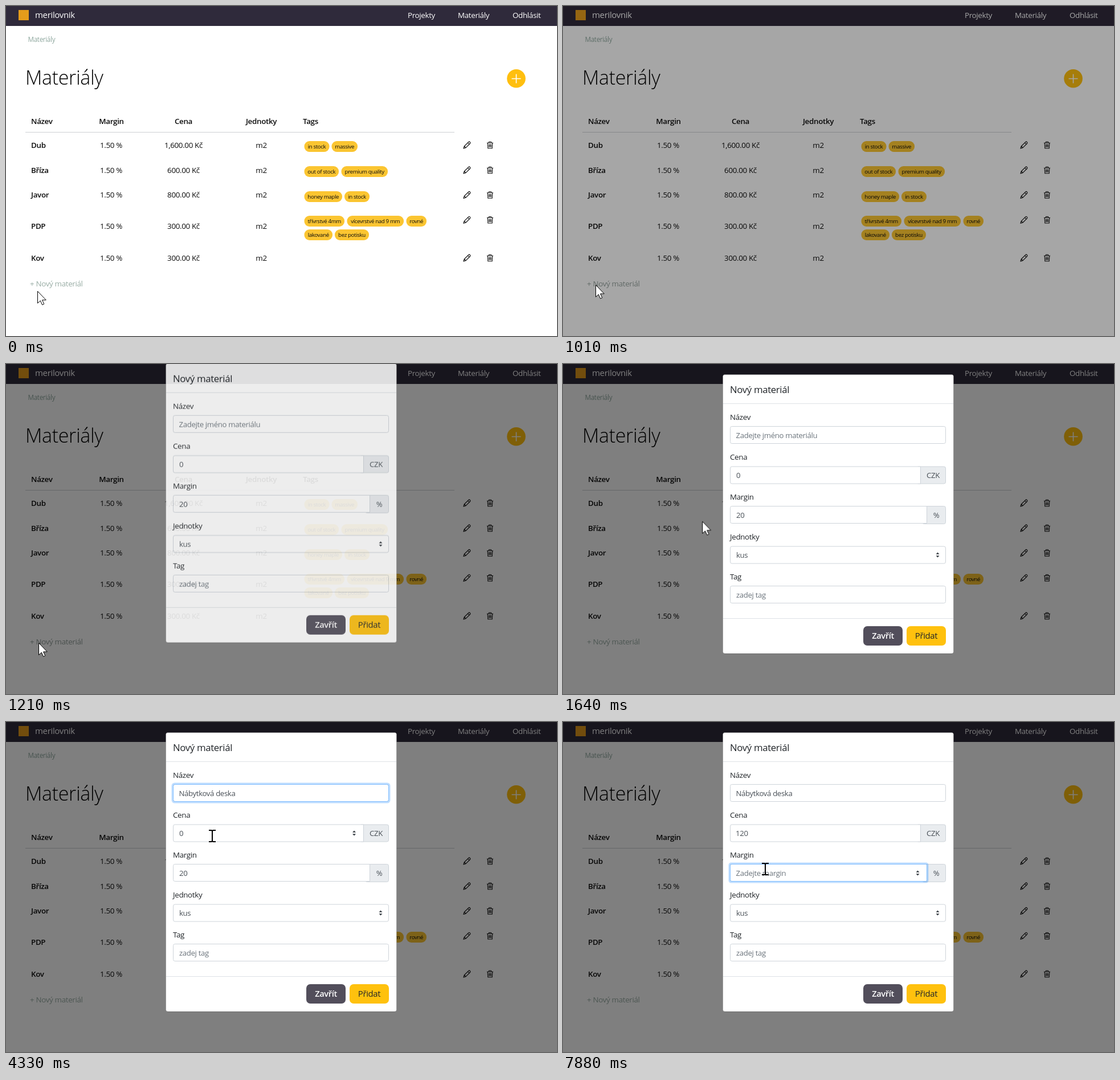
Write an HTML page that moves like this. It is 967 px wide and 579 px high and loops after 8 s.

```html
<!DOCTYPE html>
<html lang="cs">
<head>
<meta charset="utf-8">
<title>Materiály</title>
<style>
html, body { margin: 0; width: 100%; height: 100%; overflow: hidden; background: #fff; }
svg { display: block; width: 967px; height: 579px; font: 13.4px "Open Sans", "Noto Sans", sans-serif; letter-spacing: -.026em; fill: #0c0c0c; }
.mid { text-anchor: middle; }
.strong { font-weight: 600; }
.tags rect { fill: #fbc531; }
.tags text { font-size: 9.7px; }
.icon { fill: none; stroke: #111; stroke-width: 1.15; stroke-linejoin: round; }
.nav { fill: #fff; }
.box { fill: #fff; stroke: #ced4da; }
.addon { fill: #e9ecef; stroke: #ced4da; }
.value { font-size: 13.2px; fill: #495057; }
.hint { font-size: 13.2px; fill: #6c757d; }
.label { fill: #212529; }
.options text { font-size: 11.9px; font-weight: 500; }
.ring rect:first-child { fill: none; stroke: #007bff; stroke-opacity: .25; stroke-width: 3; }
.ring rect:last-child { fill: none; stroke: #80bdff; }
.caret { fill: #222; }

/* 1% = 80 ms */
.step { animation: 8s step-end infinite; }
.tween { animation: 8s linear infinite; }

#link { animation-name: link; }
@keyframes link { 0% { fill: #99ada5 } 1.6% { fill: #94a09c } 17% { fill: #99ada5 } }
#backdrop { animation-name: backdrop; }
@keyframes backdrop { 0%, 11.34% { opacity: 0 } 13.2%, 100% { opacity: .5 } }
#modal { animation-name: fade, drop; animation-timing-function: linear, ease-out; }
@keyframes fade { 0%, 13.5% { opacity: 0 } 15.4%, 100% { opacity: 1 } }
@keyframes drop { 0%, 13.5% { transform: translateY(-50px) } 17.25%, 100% { transform: none } }

#nameRing { animation-name: nameRing; }
@keyframes nameRing { 0%, 34.2% { opacity: 0 } 36.2%, 55.6% { opacity: 1 } 57.8%, 100% { opacity: 0 } }
#priceRing { animation-name: priceRing; }
@keyframes priceRing { 0%, 55.6% { opacity: 0 } 57.8%, 88.9% { opacity: 1 } 91%, 100% { opacity: 0 } }
#marginRing { animation-name: marginRing; }
@keyframes marginRing { 0%, 88.9% { opacity: 0 } 91%, 100% { opacity: 1 } }

#nameHint { animation-name: nameHint; }
@keyframes nameHint { 0% { opacity: 1 } 45.8%, 100% { opacity: 0 } }
#nameValue { animation-name: nameValue; }
@keyframes nameValue { 0% { opacity: 0 } 45.8%, 100% { opacity: 1 } }
#nameCaret { animation-name: nameCaret; }
@keyframes nameCaret { 0% { opacity: 0 } 34.9% { opacity: 1 } 42.25%, 100% { opacity: 0 } }
#options { animation-name: options; }
@keyframes options { 0%, 36.25% { opacity: 0 } 38.1%, 48.75% { opacity: 1 } 50%, 100% { opacity: 0 } }
#hover { animation-name: hover; }
@keyframes hover {
  0% { opacity: 0; transform: none }
  42.9% { opacity: 1; transform: none }
  43.8% { transform: translateY(32.5px) }
  44.8% { transform: translateY(65px) }
  45.8%, 100% { opacity: 1; transform: translateY(97.5px) }
}

#price0 { animation-name: price0; }
@keyframes price0 { 0% { opacity: 1 } 65%, 100% { opacity: 0 } }
#priceHint { animation-name: priceHint; }
@keyframes priceHint { 0% { opacity: 0 } 65% { opacity: 1 } 68.4%, 100% { opacity: 0 } }
#price1 { animation-name: price1; }
@keyframes price1 { 0% { opacity: 0 } 68.4% { opacity: 1 } 71.1%, 100% { opacity: 0 } }
#price12 { animation-name: price12; }
@keyframes price12 { 0% { opacity: 0 } 71.1% { opacity: 1 } 73.6%, 100% { opacity: 0 } }
#price120 { animation-name: price120; }
@keyframes price120 { 0% { opacity: 0 } 73.6%, 100% { opacity: 1 } }
#priceCaret { animation-name: priceCaret; }
@keyframes priceCaret {
  0% { opacity: 0; transform: translateX(8px) }
  56% { opacity: 1; transform: translateX(8px) }
  63.4% { opacity: 0 }
  65% { opacity: 1; transform: none }
  68.4% { transform: translateX(6px) }
  71.1% { transform: translateX(13px) }
  73.6% { opacity: 1; transform: translateX(19.5px) }
  80.25% { opacity: 0 }
  86.9% { opacity: 1 }
  89.4%, 100% { opacity: 0; transform: translateX(19.5px) }
}
#priceSpin { animation-name: priceSpin; }
@keyframes priceSpin { 0% { opacity: 0 } 24% { opacity: 1 } 25.5% { opacity: 0 } 51.2% { opacity: 1 } 89.4%, 100% { opacity: 0 } }

#margin20 { animation-name: margin20; }
@keyframes margin20 { 0% { opacity: 1 } 97%, 100% { opacity: 0 } }
#margin2 { animation-name: margin2; }
@keyframes margin2 { 0% { opacity: 0 } 97% { opacity: 1 } 98.5%, 100% { opacity: 0 } }
#marginHint { animation-name: marginHint; }
@keyframes marginHint { 0% { opacity: 0 } 98.5%, 100% { opacity: 1 } }
#marginCaret { animation-name: marginCaret; }
@keyframes marginCaret { 0% { opacity: 0 } 89.4% { opacity: 1 } 96%, 100% { opacity: 0 } }
#marginSpin { animation-name: marginSpin; }
@keyframes marginSpin { 0% { opacity: 0 } 86.2%, 100% { opacity: 1 } }

#pointer { animation-name: move; }
@keyframes move {
  0%, .4% { transform: translate(55px, 500px) }
  2.5%, 16.4% { transform: translate(57px, 489px) }
  19.63% { transform: translate(195px, 328px) }
  20.5% { transform: translate(244px, 276px) }
  23.75% { transform: translate(300px, 215px) }
  28%, 42.25% { transform: translate(339px, 130px) }
  46.25%, 48.75% { transform: translate(345px, 262px) }
  51.6%, 83.6% { transform: translate(362px, 200px) }
  86.9%, 100% { transform: translate(355px, 258px) }
}
#arrow { animation-name: arrow; }
@keyframes arrow { 0% { opacity: 1 } 24% { opacity: 0 } 25.5% { opacity: 1 } 27.5% { opacity: 0 } 42.55% { opacity: 1 } 48.75%, 100% { opacity: 0 } }
#beam { animation-name: beam; }
@keyframes beam { 0% { opacity: 0 } 24% { opacity: 1 } 25.5% { opacity: 0 } 27.5% { opacity: 1 } 42.55% { opacity: 0 } 48.75%, 100% { opacity: 1 } }
</style>
</head>
<body>
<svg viewBox="0 0 967 579" xmlns="http://www.w3.org/2000/svg">
  <defs>
    <g id="pencil" class="icon"><path d="M-6 6L-4.7 2L3 -5.7Q4 -6.5 5 -5.5Q6.5 -4 5.7 -3L-2 4.7ZM1.4 -4.1L4.1 -1.4M-4.7 2L-2 4.7"/></g>
    <g id="trash" class="icon"><path d="M-5.5 -3.8H5.5M-2 -4V-5.8H2V-4M-4.3 -3.5L-3.7 5.7H3.7L4.3 -3.5M-1.9 -1.5V3.7M0 -1.5V3.7M1.9 -1.5V3.7"/></g>
    <path id="updown" d="M-3 -1.3L0 -4.6L3 -1.3ZM-3 1.3L0 4.6L3 1.3Z" fill="#343a40"/>
  </defs>

  <rect width="967" height="579" fill="#fff"/>
  <rect width="967" height="35" fill="#2f2a3b"/>
  <rect x="22" y="7" width="18" height="18" fill="#e59c1b"/>
  <g class="nav">
    <text x="51" y="21" font-size="15">merilovnik</text>
    <text x="705" y="21">Projekty</text>
    <text x="793" y="21">Materiály</text>
    <text x="889" y="21">Odhlásit</text>
  </g>
  <text x="38.5" y="63" font-size="11.7" fill="#8fa89f">Materiály</text>
  <text x="34" y="137.5" font-size="34" font-weight="350" fill="#000">Materiály</text>
  <circle cx="895.5" cy="127.3" r="16.3" fill="#ffbf0f"/>
  <path d="M887.5 127.5H903.5M895.5 119.5V135.5" stroke="#fff" stroke-width="1.6"/>

  <g class="strong">
    <text x="44" y="207">Název</text>
    <text x="185" y="207" class="mid">Margin</text>
    <text x="311.5" y="207" class="mid">Cena</text>
    <text x="448" y="207" class="mid">Jednotky</text>
    <text x="521" y="207">Tags</text>
  </g>
  <path d="M34 221.5H787" stroke="#cdd0d4"/>
  <g id="rows"></g>
  <text id="link" class="step" x="42" y="491.5">+ Nový materiál</text>

  <rect id="backdrop" class="tween" width="967" height="579" fill="#000"/>

  <g id="modal" class="tween">
    <rect x="280.5" y="18.5" width="405" height="489.5" rx="3.5" fill="#fff" stroke="#000" stroke-opacity=".2"/>
    <path d="M281 69.5H685M281 446.5H685" stroke="#dee2e6"/>
    <text x="293" y="50.5" font-size="16.8" class="label">Nový materiál</text>
    <g class="label">
      <text x="293" y="98">Název</text>
      <text x="293" y="168">Cena</text>
      <text x="293" y="237.5">Margin</text>
      <text x="293" y="308">Jednotky</text>
      <text x="293" y="378">Tag</text>
    </g>

    <rect class="box" x="293.5" y="109.5" width="378" height="30" rx="3"/>
    <rect class="addon" x="620.5" y="180" width="51" height="30" rx="3"/>
    <path class="box" d="M627.5 180H296.5Q293.5 180 293.5 183V207Q293.5 210 296.5 210H627.5Z"/>
    <rect class="addon" x="630.5" y="249.5" width="41" height="31" rx="3"/>
    <path class="box" d="M638.5 249.5H296.5Q293.5 249.5 293.5 252.5V276.5Q293.5 279.5 296.5 279.5H638.5Z"/>
    <rect class="box" x="293.5" y="320" width="378" height="30" rx="3"/>
    <rect class="box" x="293.5" y="389.5" width="378" height="30" rx="3"/>

    <g id="nameRing" class="ring tween">
      <rect x="292" y="108" width="381" height="33" rx="4"/>
      <rect x="293.5" y="109.5" width="378" height="30" rx="3"/>
    </g>
    <g id="priceRing" class="ring tween">
      <rect x="292" y="178.5" width="337" height="33" rx="3"/>
      <rect x="293.5" y="180" width="334" height="30" rx="2"/>
    </g>
    <g id="marginRing" class="ring tween">
      <rect x="292" y="248" width="348" height="33" rx="3"/>
      <rect x="293.5" y="249.5" width="345" height="30" rx="2"/>
    </g>

    <text id="nameHint" class="hint step" x="303.5" y="130">Zadejte jméno materiálu</text>
    <text id="nameValue" class="value step" x="303.5" y="130">Nábytková deska</text>
    <rect id="nameCaret" class="caret step" x="304" y="117" width="1" height="16"/>

    <text id="price0" class="value step" x="304" y="200">0</text>
    <text id="priceHint" class="hint step" x="303.5" y="200">Zadejte cenu</text>
    <text id="price1" class="value step" x="303" y="200">1</text>
    <text id="price12" class="value step" x="303" y="200">12</text>
    <text id="price120" class="value step" x="303" y="200">120</text>
    <rect id="priceCaret" class="caret step" x="304" y="187" width="1" height="16"/>
    <g id="priceSpin" class="step"><use href="#updown" x="611" y="195"/></g>
    <text class="value mid" x="649.5" y="200">CZK</text>

    <text id="margin20" class="value step" x="304" y="270">20</text>
    <text id="margin2" class="value step" x="304" y="270">2</text>
    <text id="marginHint" class="hint step" x="303.5" y="270">Zadejte margin</text>
    <rect id="marginCaret" class="caret step" x="319" y="257" width="1" height="16"/>
    <g id="marginSpin" class="step"><use href="#updown" x="622.5" y="265"/></g>
    <text class="value mid" x="655" y="270">%</text>

    <text class="value" x="304" y="340">kus</text>
    <use href="#updown" x="657.5" y="335"/>
    <text class="hint" x="304" y="410">zadej tag</text>

    <rect x="527" y="460" width="69" height="34" rx="7" fill="#524e5b"/>
    <text class="mid strong" x="561.5" y="481.5" font-size="14.6" fill="#fff">Zavřít</text>
    <rect x="603" y="460" width="69" height="34" rx="7" fill="#ffc10e"/>
    <text class="mid" x="637.5" y="481.5" font-size="14.9" fill="#212529">Přidat</text>

    <g id="options" class="options tween">
      <rect x="292" y="141.5" width="381" height="210" rx="3" fill="#fff" style="filter: drop-shadow(0 1px 1.5px rgba(0,0,0,.4))"/>
      <rect id="hover" class="step" x="292" y="149.5" width="381" height="32.5" fill="#e8e8e8"/>
      <text x="303.5" y="170">Back</text>
      <text x="303.5" y="202.5">asdf</text>
      <text x="303.5" y="235">Legs</text>
      <text x="303.5" y="267.5">Nábytková deska</text>
      <text x="303.5" y="300">Desk</text>
      <text x="303.5" y="332.5">Seat</text>
    </g>
  </g>

  <g id="pointer" class="tween">
    <path id="arrow" class="step" d="M.5 .5V21.5L5.3 17.1L8.6 24.3L11.8 22.9L8.6 15.9H15.3Z" fill="#fff" stroke="#000"/>
    <path id="beam" class="step" d="M-6 -10H-2Q0 -10 0 -8Q0 -10 2 -10H6M0 -8V8M-6 10H-2Q0 10 0 8Q0 10 2 10H6" fill="none" stroke="#000" stroke-width="2"/>
  </g>
</svg>
<script>
// Row: name, price, text centre, icon centre, tags as [label, left, width, top].
const rows = [
  ['Dub', '1,600.00', 243.7, 244, [['in stock', 523.5, 44, 237], ['massive', 571.5, 45.5, 237]]],
  ['Bříza', '600.00', 287.7, 288, [['out of stock', 523.5, 60.5, 281], ['premium quality', 588.5, 81.5, 281]]],
  ['Javor', '800.00', 331.3, 331.5, [['honey maple', 523.5, 66.5, 325], ['in stock', 594, 44, 325]]],
  ['PDP', '300.00', 386.3, 375.3, [['třívrstvé 4mm', 523.5, 70.5, 368], ['vícevrstvé nad 9 mm', 598.5, 99.5, 368],
    ['rovné', 702.5, 35.5, 368], ['lakované', 523.5, 49.5, 392], ['bez potisku', 577, 60, 392]]],
  ['Kov', '300.00', 442.3, 442, []]
];
const text = (x, y, label, cls) => `<text x="${x}" y="${y}" class="${cls}">${label}</text>`;
const tag = ([label, x, w, y]) =>
  `<rect x="${x}" y="${y}" width="${w}" height="19" rx="9"/>` + text(x + w / 2, y + 13, label, 'mid');

document.getElementById('rows').innerHTML = rows.map(([name, price, y, iconY, tags]) =>
  text(44, y + 4.8, name, 'strong') +
  text(184.5, y + 4.8, '1.50 %', 'mid') +
  text(311.5, y + 4.8, price + ' Kč', 'mid') +
  text(448, y + 4.8, 'm2', 'mid') +
  `<g class="tags">${tags.map(tag).join('')}</g>` +
  `<use href="#pencil" x="809" y="${iconY}"/><use href="#trash" x="849.5" y="${iconY}"/>`
).join('');
</script>
</body>
</html>
```
